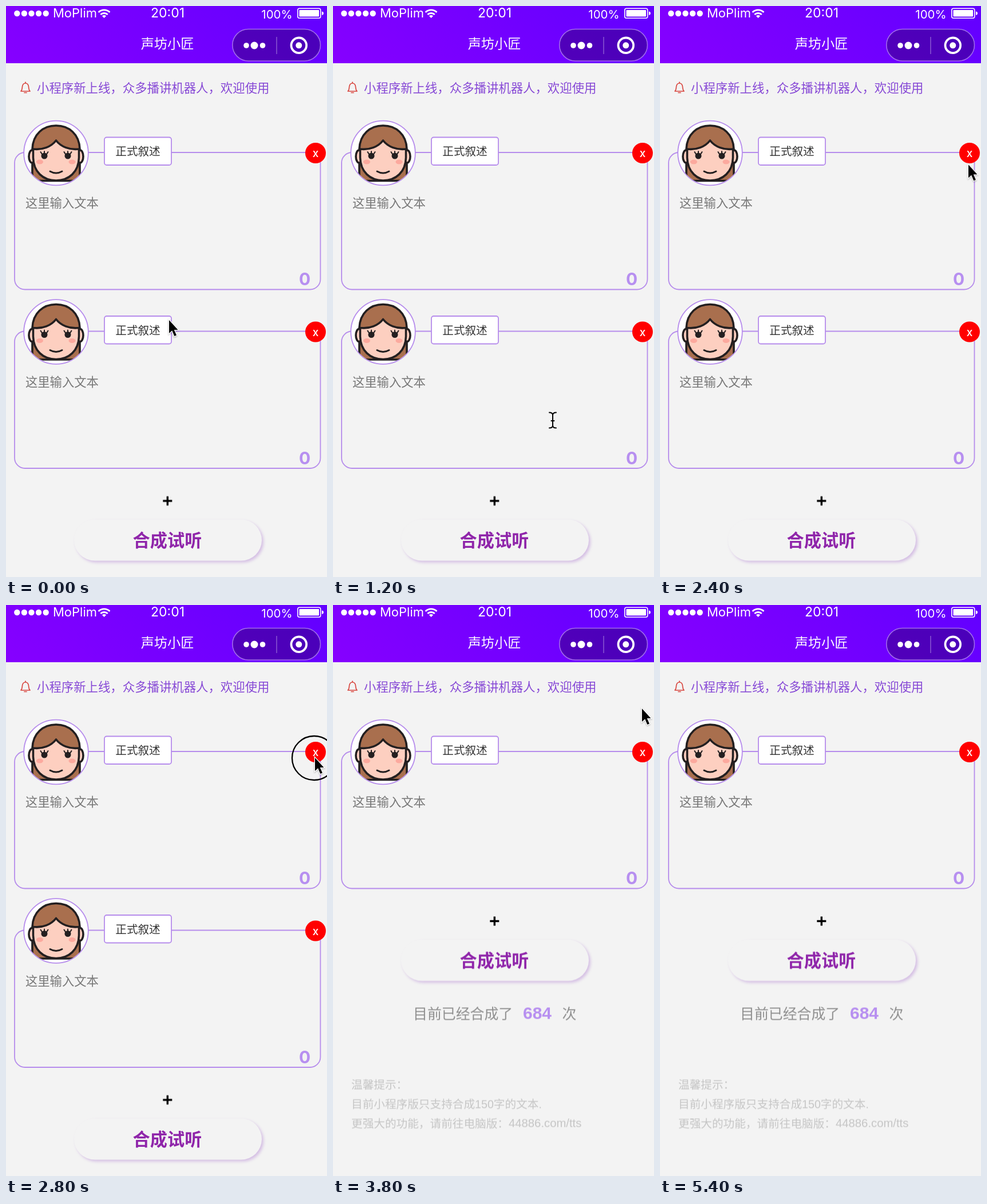
These frames come from a looping animation (561x998 px, 5800 ms). An HTML page:

```html
<!DOCTYPE html>
<html lang="zh-CN">
<head>
<meta charset="utf-8">
<title>声坊小匠</title>
<style>
  html, body { margin: 0; width: 100%; height: 100%; overflow: hidden; background: #f3f3f3; }
  svg { display: block; width: 561px; height: 998px; }
  text { font-family: "Noto Sans CJK SC", "Noto Sans CJK", sans-serif; }
  .latin { font-family: Inter, Roboto, sans-serif; }
  .mid { text-anchor: middle; }
  .white { fill: #fff; }
  .line { stroke: #b68cec; stroke-width: 1.8; }
  .hollow { fill: none; }
  .count { fill: #b78ff0; font-weight: 700; font-size: 30px; }
  .tips { fill: #c5c5c5; font-size: 19.65px; }
  .tips text { font-family: "Liberation Sans", "Noto Sans CJK SC", "Noto Sans CJK", sans-serif; }
  .ink { stroke: #231f20; stroke-width: 3.6; stroke-linejoin: round; stroke-linecap: round; }
  .hair { fill: #a96f4e; }
  .skin { fill: #fdcfc0; }
  .button { fill: #f3f3f3; filter: drop-shadow(3px 3px 2.5px rgba(150, 80, 195, .32)); }

  .anim { animation: 5800ms step-end infinite; }
  #second { animation-name: remove; }
  #foot { animation-name: rise; }
  #ring { animation-name: press; }
  #cursor { animation-name: move; }
  #arrow { animation-name: arrow; }
  #beam { animation-name: beam; }

  @keyframes remove { 0% { opacity: 1 } 51.72%, 100% { opacity: 0 } }
  @keyframes rise {
    0% { transform: translateY(312.5px) }
    51.72%, 100% { transform: none }
  }
  @keyframes press {
    0% { opacity: 0 }
    48.27% { opacity: 1 }
    51.72%, 100% { opacity: 0 }
  }
  @keyframes move {
    0% { transform: translate(285px, 549px); animation-timing-function: steps(6) }
    20.68% { transform: translate(384px, 724px); animation-timing-function: steps(4) }
    34.48% { transform: translate(537px, 298px); animation-timing-function: steps(3) }
    44.82%, 51.72% { transform: translate(540px, 267px); animation-timing-function: steps(4) }
    65.51% { transform: translate(540px, 181px) }
    93.1%, 100% { transform: translate(540px, -60px) }
  }
  @keyframes arrow {
    0% { opacity: 1 }
    10.34% { opacity: 0 }
    24.13% { opacity: 1 }
    31.03% { opacity: 0 }
    34.48%, 100% { opacity: 1 }
  }
  @keyframes beam {
    0% { opacity: 0 }
    10.34% { opacity: 1 }
    24.13% { opacity: 0 }
    31.03% { opacity: 1 }
    34.48%, 100% { opacity: 0 }
  }
</style>
</head>
<body>
<svg viewBox="0 0 561 998">
  <defs>
    <linearGradient id="violet" gradientUnits="userSpaceOnUse" x1="115" y1="215" x2="446" y2="-115">
      <stop offset="0" stop-color="#8600ff"/>
      <stop offset="1" stop-color="#6200ff"/>
    </linearGradient>
    <clipPath id="portrait"><circle cx="87.5" cy="257" r="55.6"/></clipPath>

    <g id="face" clip-path="url(#portrait)">
      <path class="hair ink" d="M46 305.500V250C47 224 65 209 87.500 209S128 224 129 250V305.500Z"/>
      <ellipse class="skin ink" cx="45.500" cy="263" rx="5.500" ry="11"/>
      <ellipse class="skin ink" cx="129.500" cy="263" rx="5.500" ry="11"/>
      <path class="skin ink" d="M47.500 250C64 252 79 246 87.500 235C96 246 111 252 127.500 250V265C127 290 110 305 87.500 305S48 290 47.500 265Z"/>
      <g fill="#fca99e">
        <ellipse cx="59" cy="272.500" rx="6" ry="4"/>
        <ellipse cx="115.500" cy="272.500" rx="6" ry="4"/>
      </g>
      <g fill="#231f20">
        <circle cx="67" cy="262" r="5.500"/>
        <circle cx="108" cy="262" r="5.500"/>
      </g>
      <path class="hollow ink" style="stroke-width:2" d="M63 259L60.500 255M67 258V254M71 259L73.500 255M104 259L101.500 255M108 258V254M112 259L114.500 255"/>
      <path class="hollow ink" style="stroke-width:3" d="M77 289Q87.500 295 98 289"/>
    </g>

    <g id="card">
      <rect class="hollow line" x="15" y="256" width="534.5" height="239.5" rx="18"/>
      <circle class="white line" cx="87.5" cy="257" r="56.3"/>
      <use href="#face"/>
      <rect class="white line" x="172" y="229.500" width="117" height="48.500" rx="4"/>
      <text class="mid" x="230.500" y="261" font-size="19.6" fill="#333">正式叙述</text>
      <circle cx="541" cy="257" r="18" fill="#f00"/>
      <text class="latin white mid" x="541" y="264" font-size="19" font-weight="500">x</text>
      <text x="34" y="352" font-size="21.3" fill="#777">这里输入文本</text>
      <text class="latin count mid" x="522" y="488">0</text>
    </g>
  </defs>

  <rect width="561" height="998" fill="#f3f3f3"/>

  <!-- status bar and title -->
  <rect width="561" height="100" fill="url(#violet)"/>
  <path class="hollow" stroke="#fff" stroke-width="10.4" stroke-linecap="round" stroke-dasharray="0 12.6" d="M19.300 13H70"/>
  <text class="latin white" x="82" y="20" font-size="22">MoPlim</text>
  <g class="hollow" stroke="#fff" stroke-width="2.8">
    <path d="M161.600 11A14 14 0 0 1 181.400 11M165.300 15A9 9 0 0 1 177.700 15"/>
  </g>
  <path class="white" d="M171.500 21L168 17.500A5 5 0 0 1 175 17.500Z"/>
  <text class="latin white mid" x="282.500" y="20" font-size="23">20:01</text>
  <text class="latin white mid" x="473.500" y="22" font-size="20.5">100%</text>
  <rect class="hollow" x="509.800" y="4.300" width="40" height="17" rx="3" stroke="#fff" stroke-width="1.6"/>
  <rect class="white" x="512.500" y="7" width="34.600" height="11.600" rx="1"/>
  <path class="white" d="M552 9.500Q555 10 555 12.800T552 16Z"/>
  <text class="white mid" x="282" y="74" font-size="23.2">声坊小匠</text>

  <rect x="395.800" y="40.500" width="153.700" height="55.500" rx="27.700" fill="#000" fill-opacity=".27" stroke="#fff" stroke-opacity=".42" stroke-width="1.6"/>
  <g class="white">
    <circle cx="420" cy="69" r="4.800"/>
    <circle cx="434" cy="69" r="6.500"/>
    <circle cx="448.500" cy="69" r="4.800"/>
    <circle cx="511.800" cy="68.800" r="5.500"/>
  </g>
  <path d="M473 54V84" stroke="#fff" stroke-opacity=".35" stroke-width="1.5"/>
  <circle class="hollow" cx="511.800" cy="68.800" r="13.300" stroke="#fff" stroke-width="3.800"/>

  <!-- notice -->
  <path class="hollow" stroke="#d8463f" stroke-width="1.700" stroke-linejoin="round" stroke-linecap="round" d="M26 149H42C39.500 146.500 39.800 144 39.500 141C39 137 37 135 34 135S29 137 28.500 141C28.200 144 28.500 146.500 26 149ZM34 135V133M32 151.500H36"/>
  <text x="54" y="151" font-size="21.4" fill="#8749d6">小程序新上线，众多播讲机器人，欢迎使用</text>

  <use href="#card"/>
  <g id="second" class="anim"><use href="#card" y="312.5"/></g>

  <g id="foot" class="anim">
    <path d="M274.300 552.500H290.300M282.300 544.500V560.500" stroke="#000" stroke-width="3.400"/>
    <rect class="button" x="119" y="585" width="328" height="72" rx="36"/>
    <text class="mid" x="282" y="632.500" font-size="30.2" font-weight="700" fill="#8f25aa">合成试听</text>
    <g font-size="24.9" fill="#8e8e8e">
      <text x="140" y="723.500">目前已经合成了</text>
      <text x="400.500" y="723.500">次</text>
    </g>
    <text class="count mid" x="357" y="723" style="font-family:'Liberation Sans',sans-serif">684</text>
    <g class="tips">
      <text x="32" y="845">温馨提示：</text>
      <text x="32" y="879">目前小程序版只支持合成150字的文本.</text>
      <text x="32" y="913">更强大的功能，请前往电脑版：</text>
      <text x="307" y="912.500" font-size="20.3" style="font-size:20.3px">44886.com/tts</text>
    </g>
  </g>

  <circle id="ring" class="anim hollow" cx="538.500" cy="267.500" r="38.500" stroke="#000" stroke-width="2.300"/>

  <g id="cursor" class="anim">
    <path id="arrow" class="anim" d="M0 0V23L5.200 18.200L9.300 28L13 26.500L8.800 17H15.500Z" stroke="#fff" stroke-width="2.600" paint-order="stroke" style="filter:drop-shadow(0 1px 1px rgba(0,0,0,.3))"/>
    <g id="beam" class="anim hollow" stroke-linecap="round">
      <path id="stem" stroke="#000" stroke-width="2" d="M-6 -13.500Q0 -13.500 0 -9V9Q0 13.500 -6 13.500M6 -13.500Q0 -13.500 0 -9M0 9Q0 13.500 6 13.500M-2.500 1H2.500"/>
    </g>
  </g>
</svg>
</body>
</html>
```
